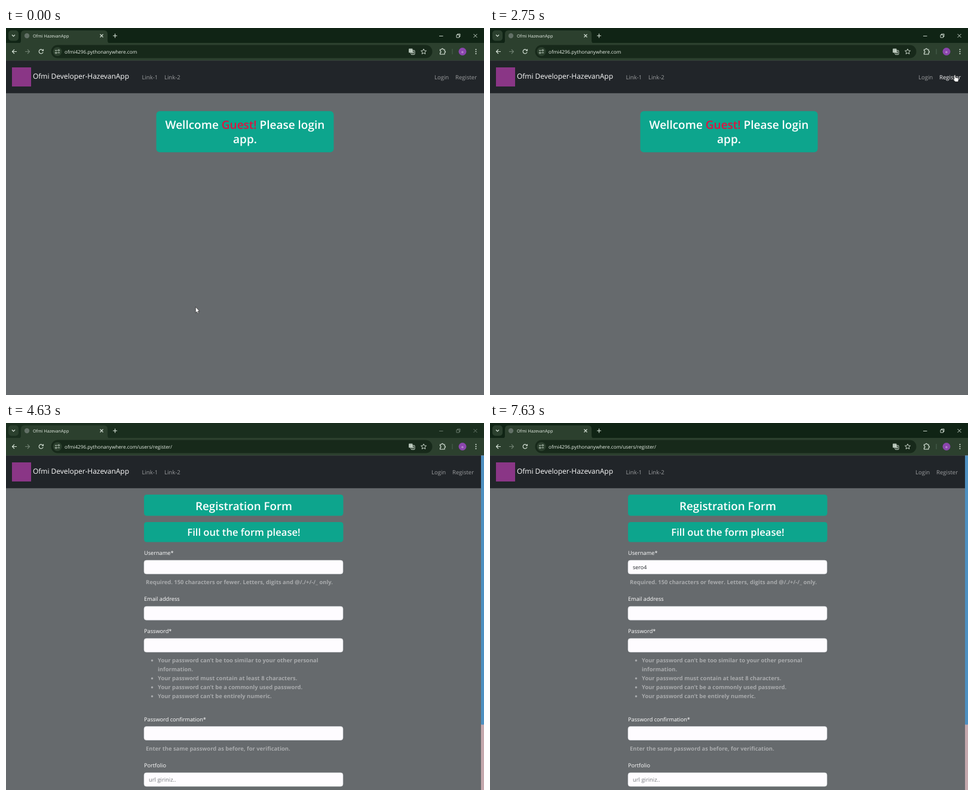
Animation of 800x615 px, one loop 8 s. Source, as an HTML page:

```html
<!DOCTYPE html>
<html lang="en">
<head>
<meta charset="utf-8">
<title>HazevanApp</title>
<style>
html, body { margin: 0; width: 100%; height: 100%; overflow: hidden; background: #666a6d; }
svg { display: block; width: 800px; height: 615px; font-family: "Open Sans", "Noto Sans", sans-serif; text-rendering: geometricPrecision; }
text { white-space: pre; }
.line { fill: none; stroke: #dbe7dc; stroke-width: 1.1; }
.thin { stroke-width: .9; }
.brand { font-size: 11.95px; fill: #fff; }
.nav { font-size: 9.55px; fill: #9b9d9f; }
.url { font-size: 8.2px; fill: #e6eee6; }
.title { font-weight: 600; fill: #fff; text-anchor: middle; }
.label { font-size: 9.2px; fill: #fff; }
.help { font-size: 9.4px; font-weight: 700; fill: #a9abad; }
.field rect { fill: #fefcff; stroke: #d3d7dc; stroke-width: .6; }
.card { fill: #0da58d; }

/* every part shares one clock; steps fall on an eighth of a second */
.anim { animation: 8s step-end -5ms infinite; }
.cursor { animation-name: travel, cursor-shown; }
.arrow { animation-name: arrow; }
.hand { animation-name: hand; }
.beam { animation-name: beam; }
.page1 { animation-name: page1; }
.page2 { animation-name: page2; }
.hover-bar { animation-name: hover-bar; }
.focus-bar { animation-name: focus-bar; }
.inactive { animation-name: inactive; }
.active-buttons { animation-name: active-buttons; }
.caret { animation-name: caret; }
.key1 { animation-name: key1; }
.key2 { animation-name: key2; }
.key3 { animation-name: key3; }
.key4 { animation-name: key4; }

@keyframes travel {
  0% { transform: translate(317px, 467px); animation-timing-function: steps(6); }
  9.375% { transform: translate(290px, 3px); animation-timing-function: steps(2); }
  12.5% { transform: translate(284px, 31px); }
  15.625% { transform: translate(284px, 33px); animation-timing-function: steps(4); }
  21.875% { transform: translate(215px, 156px); }
  23.4375% { transform: translate(195px, 274px); }
  25% { transform: translate(195px, 274px); animation-timing-function: steps(5); }
  32.8125% { transform: translate(775px, 78px); }
  39.0625% { transform: translate(400px, 112px); }
  40.625% { transform: translate(16px, 146px); }
  62.5% { transform: translate(470px, 588px); animation-timing-function: steps(3); }
  67.1875% { transform: translate(420px, 280px); animation-timing-function: steps(4); }
  73.4375% { transform: translate(405px, 243px); }
  78.125% { transform: translate(405px, 243px); animation-timing-function: steps(4); }
  84.375% { transform: translate(260px, 377px); animation-timing-function: steps(3); }
  89.0625%, 100% { transform: translate(121px, 339px); }
}
@keyframes cursor-shown { 0%, 62.5% { opacity: 1; } 43.75%, 90.625%, 100% { opacity: 0; } }
@keyframes arrow { 0%, 39.0625%, 79.6875%, 100% { opacity: 1; } 32.8125%, 73.4375% { opacity: 0; } }
@keyframes hand { 0%, 39.0625%, 100% { opacity: 0; } 32.8125% { opacity: 1; } }
@keyframes beam { 0%, 79.6875%, 100% { opacity: 0; } 73.4375% { opacity: 1; } }
@keyframes page1 { 0% { opacity: 1; } 39.0625%, 100% { opacity: 0; } }
@keyframes page2 { 0% { opacity: 0; } 39.0625%, 100% { opacity: 1; } }
@keyframes hover-bar { 0%, 15.625%, 100% { opacity: 0; } 10.9375% { opacity: 1; } }
@keyframes focus-bar { 0%, 26.5625%, 100% { opacity: 0; } 15.625% { opacity: 1; } }
@keyframes inactive { 0%, 70.3125%, 100% { opacity: 0; } 51.5625% { opacity: 1; } }
@keyframes active-buttons { 0%, 70.3125%, 100% { opacity: 1; } 51.5625% { opacity: .45; } }
@keyframes caret { 0%, 48.4375%, 79.6875%, 90.625%, 100% { opacity: 0; } 39.0625%, 73.4375%, 85.9375% { opacity: 1; } }
@keyframes key1 { 0% { fill-opacity: 0; } 90.625%, 100% { fill-opacity: 1; } }
@keyframes key2 { 0% { fill-opacity: 0; } 92.1875%, 100% { fill-opacity: 1; } }
@keyframes key3 { 0% { fill-opacity: 0; } 93.75%, 100% { fill-opacity: 1; } }
@keyframes key4 { 0% { fill-opacity: 0; } 95.3125%, 100% { fill-opacity: 1; } }
</style>
</head>
<body>
<svg viewBox="0 0 800 615">
  <rect width="800" height="615" fill="#666a6d"/>

  <!-- tab strip -->
  <rect width="800" height="26" fill="#102415"/>
  <rect class="anim inactive" width="800" height="26" fill="#1a2e1e"/>
  <rect x="4" y="4" width="17" height="17.5" rx="5" fill="#2b402e"/>
  <path class="line" d="M10 11.5l2.5 2.5 2.5-2.5"/>
  <path d="M20 26q5 0 5-5V10q0-6 6-6H164q6 0 6 6V21q0 5 5 5z" fill="#2c402e"/>
  <circle cx="35" cy="13" r="4.2" fill="#627066"/>
  <text x="45" y="15.8" font-size="7.2" fill="#e6eee6">Ofmi HazevanApp</text>
  <path class="line" d="M157.5 10.5l5 5m0-5l-5 5M179 13h7m-3.5-3.5v7"/>
  <path class="line thin anim active-buttons" d="M725 13.5h6.500M754 11.5h4.500v4.500h-4.500zM755.500 11.500v-1.500h4.500v4.500h-1.500M782.500 10l6 6m0-6l-6 6"/>

  <!-- toolbar -->
  <rect y="25" width="800" height="29.5" fill="#2c402e"/>
  <path class="line" d="M18 39.5h-7.5m3.5-3.5l-3.5 3.5 3.5 3.5"/>
  <path class="line" opacity=".4" d="M32 39.5h7.5m-3.5-3.5l3.5 3.5-3.5 3.5"/>
  <path class="line" d="M61.5 37.3a3.5 3.5 0 1 0 .6 3M62.5 35.5v2.5h-2.5"/>
  <rect x="75.5" y="28.5" width="638" height="22" rx="11" fill="#17291a"/>
  <rect class="anim hover-bar" x="75.5" y="28.5" width="638" height="22" rx="11" fill="#344536"/>
  <text class="url anim page1" x="98" y="42.5">ofmi4296.pythonanywhere.com</text>
  <text class="url anim page2" x="98" y="42.5">ofmi4296.pythonanywhere.com/users/register/</text>
  <g class="anim focus-bar">
    <rect x="75" y="28.5" width="639" height="21.5" rx="10.75" fill="#293b2c" stroke="#a3e6b4" stroke-width="1.5"/>
    <rect x="97.5" y="33" width="122.5" height="13.5" fill="#a6dcab"/>
    <text class="url" x="98" y="42.5" style="fill:#14301c">ofmi4296.pythonanywhere.com</text>
    <rect x="597" y="32" width="69" height="15" rx="7.5" fill="#36553f"/>
    <circle cx="605.5" cy="39.5" r="4" fill="#a3e6b4"/>
    <text x="614" y="42.5" font-size="8" font-weight="600" fill="#c5f0cf">Veltio Scan</text>
  </g>
  <circle cx="86" cy="39.5" r="7.5" fill="#2c402e"/>
  <path class="line thin" d="M82 37.5h3.5M86.5 41.5h3.5"/>
  <circle class="line thin" cx="88.3" cy="37.5" r="1.3"/>
  <circle class="line thin" cx="83.7" cy="41.5" r="1.3"/>
  <rect x="674" y="34.5" width="6.5" height="7" rx="1" fill="#b4c2b6"/>
  <rect class="line thin" x="678" y="37.5" width="6" height="7" rx="1"/>
  <path class="line thin" d="M679.5 40h3m-1.5-1v1m1 0q-.5 2-2 3m.5-2l2 2"/>
  <path class="line thin" d="M699 35l1.3 2.9 3.2.3-2.4 2.1.7 3.2-2.8-1.7-2.8 1.7.7-3.2-2.4-2.1 3.2-.3z"/>
  <path class="line" d="M726.5 36h2.5q0-1.7 1.3-1.7T731.6 36h2.4v2.6q1.5 0 1.5 1.3t-1.5 1.3V44h-7.5v-2.4q1.6-.2 1.6-1.6t-1.6-1.6z"/>
  <path d="M747 35v9" stroke="#4a6350"/>
  <circle cx="764" cy="39.5" r="6.5" fill="#8b46ad"/>
  <text x="764" y="41.5" font-size="5.5" fill="#fff" text-anchor="middle">o</text>
  <g fill="#dbe7dc"><circle cx="786.5" cy="36" r="1"/><circle cx="786.5" cy="39.5" r="1"/><circle cx="786.5" cy="43" r="1"/></g>

  <!-- site navigation -->
  <rect y="54.5" width="800" height="54.8" fill="#212529"/>
  <rect x="10" y="66" width="32" height="32" fill="#8a3686"/>
  <text class="brand" x="45" y="85">Ofmi Developer-HazevanApp</text>
  <text class="nav" x="227.5" y="86">Link-1</text>
  <text class="nav" x="265" y="86">Link-2</text>

  <g class="anim page1">
    <text class="nav" x="717" y="86">Login</text>
    <text class="nav" x="752" y="86">Register</text>
    <text class="nav anim hand" x="752" y="86" style="fill:#c8c9ca">Register</text>
    <rect class="card" x="251.5" y="139.3" width="297" height="68.9" rx="6"/>
    <text class="title" x="400" y="169" font-size="19">Wellcome <tspan fill="#e01240">Guest!</tspan> Please login</text>
    <text class="title" x="400" y="193" font-size="19">app.</text>
  </g>

  <g class="anim page2">
    <text class="nav" x="712" y="86">Login</text>
    <text class="nav" x="747" y="86">Register</text>
    <rect x="795" y="54.5" width="5" height="561" fill="#c4a8ad"/>
    <rect x="795" y="54.5" width="5" height="451" rx="1" fill="#4d8fc0"/>
    <rect class="card" x="231" y="120" width="333.5" height="35.5" rx="4.5"/>
    <text class="title" x="398" y="146" font-size="18.8">Registration Form</text>
    <rect class="card" x="231" y="166" width="333.5" height="33.5" rx="4.5"/>
    <text class="title" x="398" y="189.3" font-size="16.6">Fill out the form please!</text>

    <g class="label">
      <text x="231" y="220.5">Username*</text>
      <text x="231" y="298">Email address</text>
      <text x="231" y="352">Password*</text>
      <text x="231" y="499.5">Password confirmation*</text>
      <text x="231" y="577">Portfolio</text>
    </g>
    <g class="field">
      <rect x="231" y="230" width="333" height="23" rx="4"/>
      <rect x="231" y="307.3" width="333" height="23" rx="4"/>
      <rect x="231" y="361" width="333" height="23" rx="4"/>
      <rect x="231" y="508.5" width="333" height="23" rx="4"/>
      <rect x="231" y="586" width="333" height="23" rx="4"/>
    </g>
    <g class="help">
      <text x="234" y="270">Required. 150 characters or fewer. Letters, digits and @/./+/-/_ only.</text>
      <text x="254" y="401.3">Your password can’t be too similar to your other personal</text>
      <text x="254" y="416.3">information.</text>
      <text x="254" y="431.3">Your password must contain at least 8 characters.</text>
      <text x="254" y="446.3">Your password can’t be a commonly used password.</text>
      <text x="254" y="461.3">Your password can’t be entirely numeric.</text>
      <text x="234" y="549">Enter the same password as before, for verification.</text>
      <circle cx="244.5" cy="398" r="1.8"/>
      <circle cx="244.5" cy="428" r="1.8"/>
      <circle cx="244.5" cy="443" r="1.8"/>
      <circle cx="244.5" cy="458" r="1.8"/>
    </g>
    <text x="239" y="601.3" font-size="9.4" fill="#75797e">url giriniz..</text>
    <text x="239" y="244.7" font-size="9" fill="#212529"><tspan class="anim key1">s</tspan><tspan class="anim key2">er</tspan><tspan class="anim key3">o</tspan><tspan class="anim key4">4</tspan></text>
    <path class="anim caret" d="M239 234.5v13" stroke="#212529"/>
  </g>

  <!-- pointer -->
  <g class="anim cursor">
    <path class="anim arrow" d="M.3.3V10.3L2.5 8.3 4 11.7 5.5 11 4.1 7.7H7z" fill="#fff" stroke="#111" stroke-width=".6"/>
    <path class="anim hand" d="M2 8V1.2q1-1.2 2 0V5l4.5 1q1 .3 1 1.5L8.5 12H3.5L0 8q.8-1.2 2 0z" fill="#fff" stroke="#111" stroke-width=".6"/>
    <path class="anim beam" d="M-2-5h1.5l.5.5.5-.5H2M0-4.5v9M-2 5h1.5l.5-.5.5.5H2" fill="none" stroke="#222" stroke-width=".9"/>
  </g>
</svg>
</body>
</html>
```
